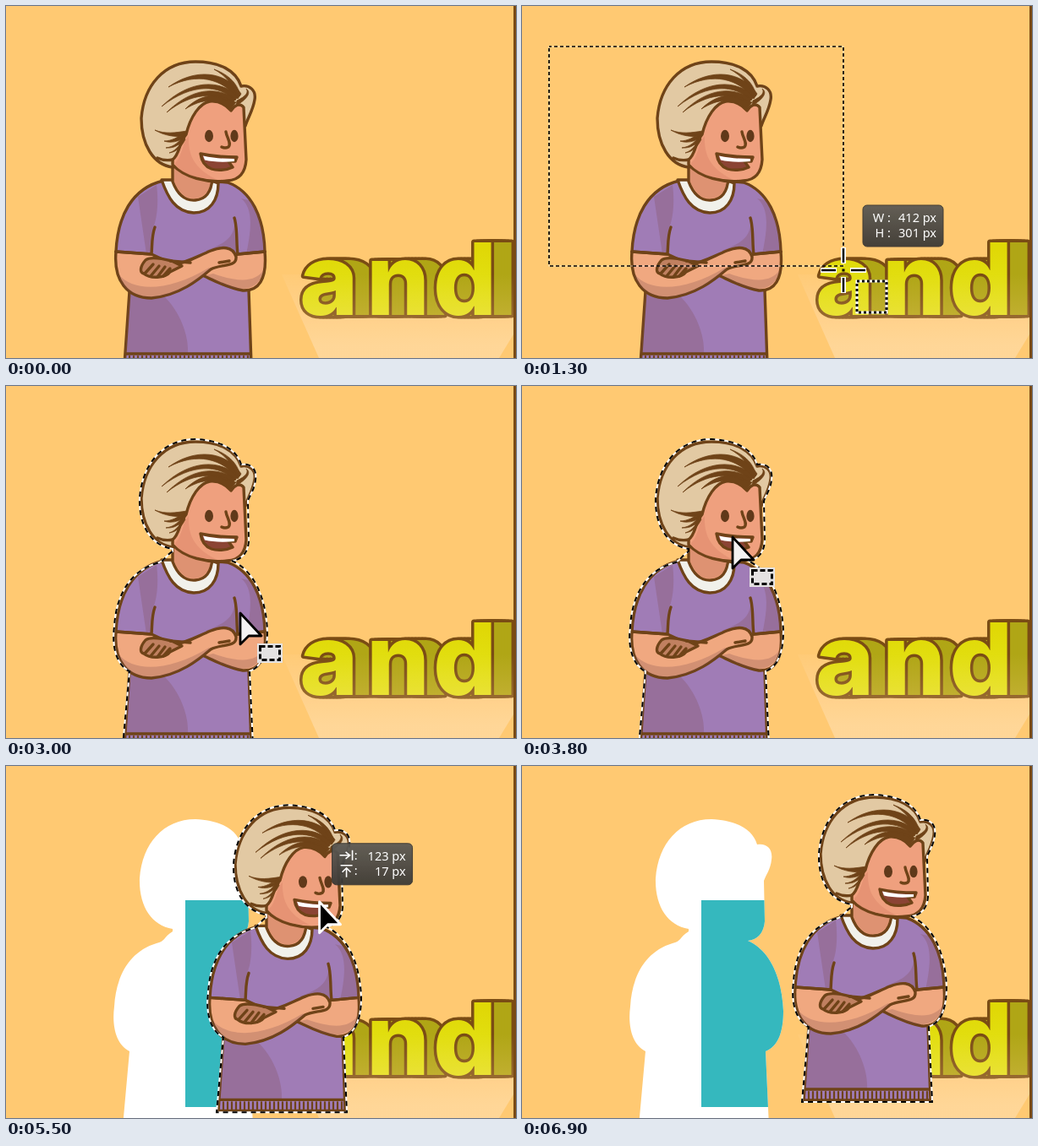
An HTML page that plays this animation: 603 by 417 pixels, repeating every 7.1 s.

```html
<!DOCTYPE html>
<html lang="en">
<head>
<meta charset="utf-8">
<title>Select and move</title>
<style>
html, body { margin: 0; width: 100%; height: 100%; overflow: hidden; background: #ffc972; }
svg { display: block; }
.word { font: 800 118px Inter, "Open Sans", sans-serif; }
.tip text { font: 14.5px "Noto Sans", "Open Sans", sans-serif; fill: #fff; text-anchor: end; }
.line { fill: none; stroke: #6f4318; stroke-width: 3.4; stroke-linecap: round; stroke-linejoin: round; }
.thin { stroke-width: 2.2; }
.shape { stroke: #6f4318; stroke-width: 3.4; stroke-linejoin: round; }
.shade { fill: #7c4a50; opacity: .26; }
.strand { fill: #6f4318; stroke: #6f4318; stroke-width: .8; stroke-linejoin: round; }
</style>
</head>
<body>
<svg width="603" height="417" viewBox="0 0 603 417">
  <defs>
    <linearGradient id="lime" x1="0" y1="0" x2="0" y2="1">
      <stop offset=".25" stop-color="#e0d806"/><stop offset=".8" stop-color="#e4e61c"/>
    </linearGradient>
    <linearGradient id="glow" x1="0" y1="0" x2="0" y2="1">
      <stop offset="0" stop-color="#ffdfb0" stop-opacity=".08"/><stop offset=".85" stop-color="#ffdfb0" stop-opacity=".6"/>
    </linearGradient>
    <linearGradient id="haze" x1="0" y1="0" x2="0" y2="1">
      <stop offset="0" stop-color="#ffd090" stop-opacity="0"/><stop offset="1" stop-color="#ffd090" stop-opacity=".25"/>
    </linearGradient>
    <linearGradient id="panel" x1="0" y1="0" x2="0" y2="1">
      <stop offset="0" stop-color="#5c5a55"/><stop offset="1" stop-color="#3b3936"/>
    </linearGradient>
    <path id="outline" d="M197 193C172 189 157 166 158 133C161 92 186 63 224 63C250 64 272 73 278 93C289 91 297 98 295 111C294 122 288 130 286 136L287 184C286 198 278 206 267 207C292 218 307 248 309 290C309 315 303 332 288 338L292 427H138L146 338C130 330 125 308 128 285C130 250 145 220 178 210C188 208 186 203 197 196Z"/>
    <path id="body" d="M186 207C148 216 132 250 130 291L146 338L140 425H290L287 336L306 291C305 250 290 219 262 209L250 208Z"/>
    <clipPath id="inside"><use href="#outline"/></clipPath>
    <clipPath id="shirtClip"><use href="#body"/></clipPath>
  </defs>

  <rect width="603" height="417" fill="#ffc972"/>
  <path d="M326 318H603V384L583 417H370Z" fill="url(#glow)"/>
  <g id="lettering"></g>
  <path d="M326 318H603V376H352Z" fill="url(#haze)"/>
  <rect x="600" width="3" height="417" fill="#7a4a14"/>

  <g id="hole">
    <use href="#outline" fill="#fff"/>
    <rect x="212" y="159" width="100" height="245" fill="#35b8be" clip-path="url(#inside)"/>
  </g>

  <g id="person">
    <use href="#body" class="shape" fill="#a07cb6"/>
    <g clip-path="url(#shirtClip)">
      <path class="shade" d="M140 338L186 343C206 362 216 390 215 412H138Z" opacity=".35"/>
      <path class="shade" d="M278 228C293 240 290 266 284 294H312V236Z"/>
      <path class="shade" d="M174 262C180 250 180 225 178 212L156 226L166 294H172Z" opacity=".12"/>
      <path class="shade" d="M270 254C272 278 250 284 236 290L275 294Z"/>
      <path class="line" d="M138 412H293"/>
      <path id="ribs" class="line thin"/>
    </g>
    <path class="shape" fill="#f0a880" d="M306 291C309 325 298 338 280 337C258 333 242 323 230 318L262 300L274 294Z"/>
    <path class="shade" d="M305 312C296 327 276 328 245 317L236 319C258 332 270 336 282 335C296 333 303 324 305 312Z"/>
    <path class="shape" fill="#f0a880" d="M130 291C127 325 143 346 172 346C205 343 228 324 242 312C255 305 273 310 272 297C268 284 255 285 242 290C225 297 212 305 198 306L172 294Z"/>
    <path class="shade" d="M133 318C150 338 190 340 240 310L242 312C220 330 200 343 172 345C150 344 136 334 133 318Z"/>
    <path class="shape" fill="#c08060" stroke-width="2.600" d="M208 308L196 302C184 299 170 297 165 301C158 309 158 316 163 317C170 323 188 323 194 315Z"/>
    <path class="line" stroke-width="2.600" d="M164 317L174 306M171 320L181 308M179 321L188 309M186 320L194 311M194 302L218 304"/>
    <path class="line" d="M176 262C172 273 173 283 172 294M270 251C274 264 272 280 274 294M130 291L172 294M274 294L306 291M252 304L264 302"/>

    <path class="shape" fill="#f1f1eb" d="M184 206C191 226 200 244 222 245C241 245 251 230 251 210L240 206H195Z"/>
    <path class="shape" fill="#eea07c" d="M197 178V208C203 224 212 231 224 230C238 229 243 218 244 204Z"/>
    <path d="M199 190L199 208C205 222 213 229 224 228C236 226 241 217 242 208Z" fill="#c07860" opacity=".35"/>

    <path class="shape" fill="#e2c9a3" d="M197 191C174 188 160 164 160 133C163 94 187 66 224 66C252 66 272 76 278 95C288 93 296 100 294 111C292 124 286 132 283 142L215 186Z"/>
    <path class="shape" fill="#efa07e" d="M197 182C206 175 204 162 213 152C218 131 229 115 241 113C252 112 260 117 266 124C270 118 276 114 281 120L284 182C283 198 276 206 262 207C238 210 210 203 197 188Z"/>
    <path d="M200 186C210 176 207 164 216 154C215 176 222 192 248 205C226 205 208 199 200 188Z" fill="#d98468" opacity=".45"/>
    <path class="strand" d="M278 104C260 77 224 73 192 96C226 78 256 86 274 110ZM274 107C254 87 218 86 184 119C220 91 252 93 271 112ZM271 110C248 94 218 98 190 126C220 102 248 102 268 116ZM268 113C248 101 228 106 212 122C232 110 248 108 266 122L272 114ZM277 106C273 89 260 80 246 75C259 82 268 92 273 108ZM273 112C284 107 287 102 284 98C291 103 284 111 272 118Z"/>
    <path class="strand" d="M176 147C189 152 200 150 214 148L212 155C200 155 188 154 176 147ZM187 160C196 160 204 155 211 150V156C204 160 196 163 187 160ZM189 168C199 167 206 160 210 153L212 156C207 163 200 169 189 168ZM193 174C202 171 207 163 210 155L212 158C208 166 202 173 193 174Z"/>
    <path class="line" d="M179 180Q188 184 197 182"/>
    <ellipse cx="240" cy="154" rx="5" ry="7.2" fill="#60391a"/>
    <ellipse cx="270" cy="154" rx="4.6" ry="7.2" fill="#60391a"/>
    <path class="line" stroke-width="2.800" d="M260 149C261 156 267 163 263 167Q259 169 255 167"/>
    <path class="shape" d="M230 175C244 178 258 179 273 179L271 184H263L268 191C260 195 249 195 243 193C235 190 231 183 230 175Z" fill="#8b4434"/>
    <path fill="#fff" d="M233 177.500C246 180.500 258 181 270 181V184C256 185.500 244 184.500 235 182.500Z"/>
  </g>

  <g id="selection" fill="none" stroke-width="2">
    <use href="#outline" stroke="#fff"/>
    <use href="#outline" id="ants" stroke="#000" stroke-dasharray="6 5"/>
  </g>
  <g id="marquee" fill="none" stroke-width="1.700">
    <path stroke="#fff" opacity=".35"/>
    <path stroke="#000" stroke-dasharray="4 3"/>
  </g>

  <g id="cross">
    <path d="M-27 0H-8M8 0H27M0 -27V-8M0 8V27" stroke="#fff" stroke-width="6"/>
    <path d="M-26 0H-9M9 0H26M0 -26V-9M0 9V26" stroke="#000" stroke-width="2.500"/>
    <rect x="-1.500" y="-1.500" width="3" height="3"/>
    <g fill="none" stroke-width="3"><rect x="16" y="13" width="35" height="37" stroke="#fff"/>
    <rect x="16" y="13" width="35" height="37" stroke="#000" stroke-dasharray="3 3"/></g>
  </g>
  <g id="arrow">
    <path id="pointer" d="M1 1V38L11 28H26Z" stroke-width="2.800" stroke-linejoin="round"/>
    <g id="box" fill="none"><rect x="21" y="37" width="30" height="23" fill="#e4e2e2"/>
    <rect x="24.500" y="40.500" width="23" height="16" stroke="#000" stroke-width="3" stroke-dasharray="6 3"/></g>
    <g id="scissors" fill="none"></g>
  </g>
  <g id="tip" class="tip">
    <rect width="95" height="49" rx="5" fill="url(#panel)" stroke="#3a3630" opacity=".95"/>
    <g id="sizeLabels"><text x="33" y="20">W :</text><text x="33" y="38">H :</text></g>
    <g id="moveLabels"><text x="30" y="19">:</text><text x="30" y="37">:</text>
      <path d="M9 14H21M16 10L21 14L16 18M24 8V20M10 26H24M17 40V29M12 34L17 29L22 34" fill="none" stroke="#fff" stroke-width="1.600"/></g>
    <text id="first" x="87" y="20"></text><text id="second" x="87" y="38"></text>
  </g>
</svg>
<script>
const LOOP = 7100, STEP = 100;
const $ = id => document.getElementById(id);
const show = (id, on) => $(id).setAttribute("display", on ? "inline" : "none");
const place = (id, x, y) => $(id).setAttribute("transform", `translate(${x} ${y})`);

// Extruded lettering: side outlines, side faces, then the front.
const word = (dx, paint) => `<text class="word" x="${[347, 426, 505].map(x => x + dx).join(" ")}" y="366" ${paint}>and</text>`;
const edge = 'stroke="#7a4c14" stroke-width="7" stroke-linejoin="round" paint-order="stroke"';
const depths = [24, 20, 16, 12, 8, 4];
$("lettering").innerHTML =
  depths.map(d => word(d, `fill="#7a4c14" ${edge}`)).join("") +
  depths.map(d => word(d, 'fill="#b0a616"')).join("") +
  word(0, `fill="url(#lime)" ${edge}`);

$("ribs").setAttribute("d", Array.from({ length: 30 }, (_, i) => `M${141 + i * 5} 415V425`).join(""));

const blades = "M22 40L42 51M22 53L42 42";
const loops = '<ellipse cx="46" cy="40" rx="5" ry="4"/><ellipse cx="46" cy="53" rx="5" ry="4"/>';
$("scissors").innerHTML = [["#fff", 6.5], ["#000", 3]].map(([color, width]) =>
  `<g stroke="${color}" stroke-width="${width}"><path d="${blades}"/>${loops}</g>`).join("");

// Keys are [time, x, y]; positions between them are linear.
function follow(keys, t) {
  const i = keys.findIndex(k => k[0] > t);
  if (i < 0) return keys[keys.length - 1].slice(1);
  if (i === 0) return keys[0].slice(1);
  const a = keys[i - 1], b = keys[i], p = (t - a[0]) / (b[0] - a[0]);
  return [a[1] + (b[1] - a[1]) * p, a[2] + (b[2] - a[2]) * p];
}

const CORNER = [32, 48];
const mouse = [
  [300, 491, 16], [500, 360, 22], [700, 110, 40], [800, 45, 47], [900, 32, 48],
  [1000, 150, 172], [1200, 315, 266], [1300, 380, 313], [1400, 444, 349], [1500, 485, 390],
  [1600, 435, 415], [1700, 365, 425], [1800, 335, 425], [2000, 335, 425],
  [2300, 326, 375], [2500, 310, 328], [2600, 295, 305], [2800, 278, 280], [3100, 275, 262],
  [3200, 275, 262], [3500, 262, 218], [3700, 250, 182], [3800, 248, 178]
];
const exit = [[5900, 443, 149], [6200, 448, 150], [6400, 458, 154], [6600, 560, 175], [6800, 650, 190]];
const drag = [0, 8, 36, 76, 111, 143, 170, 190, 193].map((x, i) => [5100 + i * STEP, x, -.15 * x]);

function draw(time) {
  const t = Math.floor(time / STEP) * STEP;
  const framing = t >= 1000 && t < 2100;
  const moving = t >= 5200 && t < 5900;
  const cutting = t >= 4800;
  const [dx, dy] = follow(drag, t);
  const lead = follow(drag, t + 33);
  const [mx, my] = t >= 5900 ? follow(exit, t)
    : t >= 5100 ? [248 + lead[0], 178 + lead[1]] : follow(mouse, t);

  show("hole", t >= 5200);
  place("person", dx, dy);
  place("selection", dx, dy);
  show("selection", t >= 2100);
  const march = Math.floor((t - 30) / 150) * -2.5;
  $("ants").setAttribute("stroke-dashoffset", march);

  show("marquee", framing);
  for (const path of $("marquee").children) {
    path.setAttribute("d", `M${CORNER}H${mx}V${my - 5}H${CORNER[0]}Z`);
  }
  $("marquee").lastElementChild.setAttribute("stroke-dashoffset", march);

  show("cross", t >= 300 && t < 2600);
  place("cross", mx, my);
  show("arrow", t >= 2600 && t < 6900);
  place("arrow", mx, my);
  $("pointer").setAttribute("fill", cutting ? "#000" : "#f4f2f2");
  $("pointer").setAttribute("stroke", cutting ? "#fff" : "#000");
  show("box", !cutting);
  show("scissors", cutting && !moving && t < 6500);

  show("tip", framing || moving);
  show("sizeLabels", framing);
  show("moveLabels", moving);
  place("tip", mx + (framing ? 23 : 16), my - (framing ? 77 : 68));
  const next = follow(mouse, t + STEP);
  const values = framing ? [next[0] - CORNER[0], next[1] - CORNER[1]] : [lead[0] + 1, lead[0] * .14];
  $("first").textContent = Math.round(values[0]) + " px";
  $("second").textContent = Math.round(values[1]) + " px";
}

const start = performance.now();
function tick() {
  draw((performance.now() - start) % LOOP);
  requestAnimationFrame(tick);
}
tick();
</script>
</body>
</html>
```
